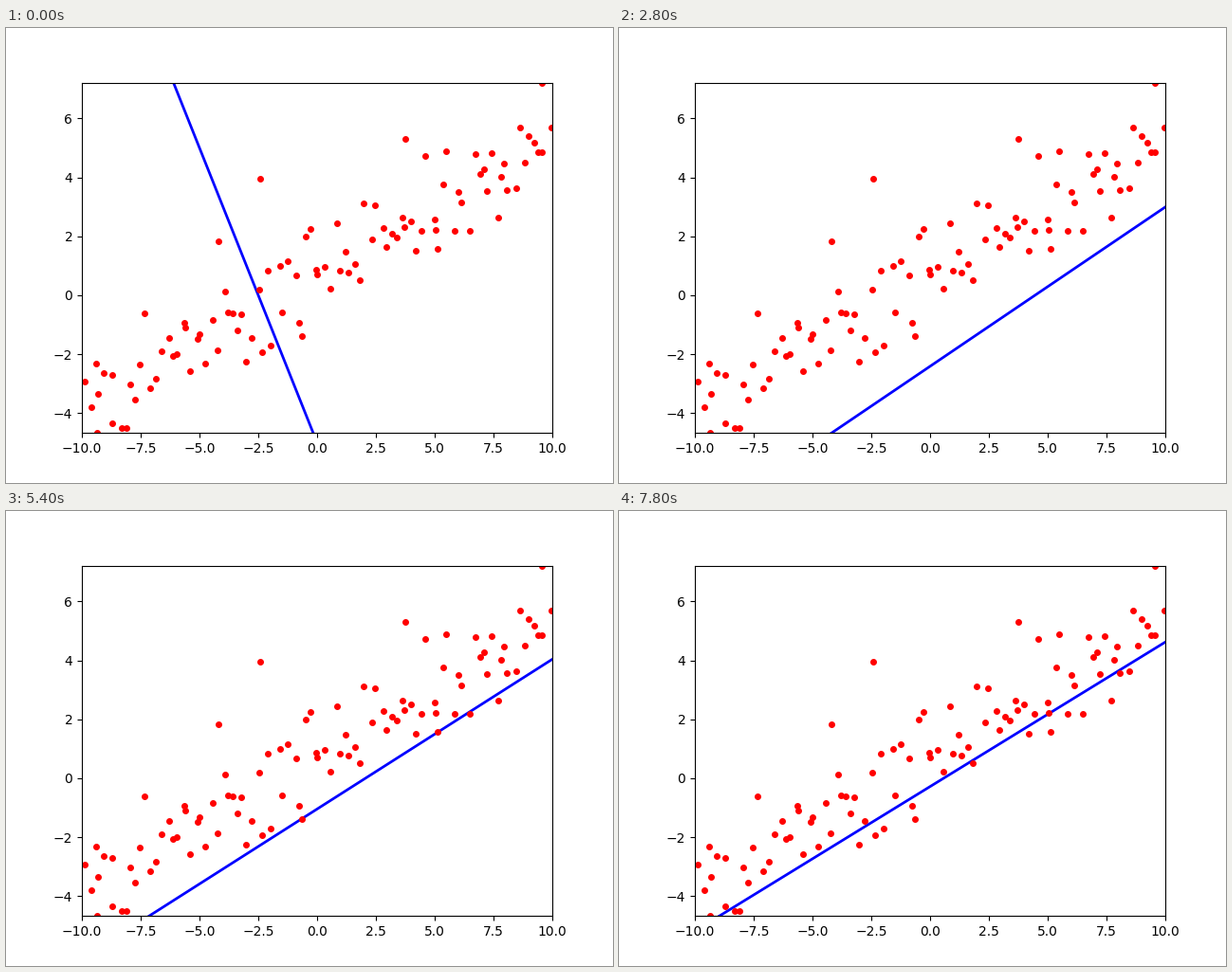
Recreate the animation shown at these times as a matplotlib script. Size 640 by 480 pixels, loop 8000 ms.

```python
import numpy as np
import matplotlib.pyplot as plt
from matplotlib.animation import FuncAnimation

FRAMES = 40
INTERVAL = 200
POINTS = 100
RATE = 0.04
SLOPE, OFFSET = 0.461, 0.955    # best fit, where the descent settles
MEAN_X, MEAN_XX = 0.78, 34.1    # moments of the samples
Y_MIN, Y_MAX = -4.67, 7.214

# The extremes and clear outliers of the cloud
OUTLIERS = [(-9.35, Y_MIN), (9.54, Y_MAX), (-2.40, 3.94), (-4.19, 1.82),
            (3.77, 5.32), (-0.63, -1.38), (5.14, 1.59), (7.72, 2.65)]


def samples():
    """Evenly spread, jittered x with noisy y around the best fit."""
    rng = np.random.default_rng(7)
    n = POINTS - len(OUTLIERS)
    step = 20 / n
    x = -10 + step * (np.arange(n) + rng.uniform(0, 1, n))
    noise = np.clip(rng.normal(0, 1, n), -1.8, 1.8)
    y = np.clip(SLOPE * x + OFFSET + noise, -4.5, 5.7)
    return np.vstack([np.column_stack([x, y]), OUTLIERS]).T


def descend(w, b, steps):
    """Gradient descent on the mean squared error of w * x + b."""
    path = []
    for _ in range(steps):
        path.append((w, b))
        dw, db = w - SLOPE, b - OFFSET
        w -= RATE * (MEAN_XX * dw + MEAN_X * db)
        b -= RATE * (MEAN_X * dw + db)
    return path


path = descend(-2.0, -5.0, FRAMES)
ends = np.array([-10.0, 10.0])

fig, ax = plt.subplots(figsize=(6.4, 4.8), dpi=100)
ax.set_xlim(-10, 10)
ax.set_ylim(Y_MIN, Y_MAX)
line, = ax.plot([], [], color="blue", lw=2)
ax.plot(*samples(), "ro", markersize=4)


def update(i):
    w, b = path[i]
    line.set_data(ends, w * ends + b)
    return line,


anim = FuncAnimation(fig, update, frames=FRAMES, interval=INTERVAL,
                     repeat=True, repeat_delay=0)
plt.show()
```
